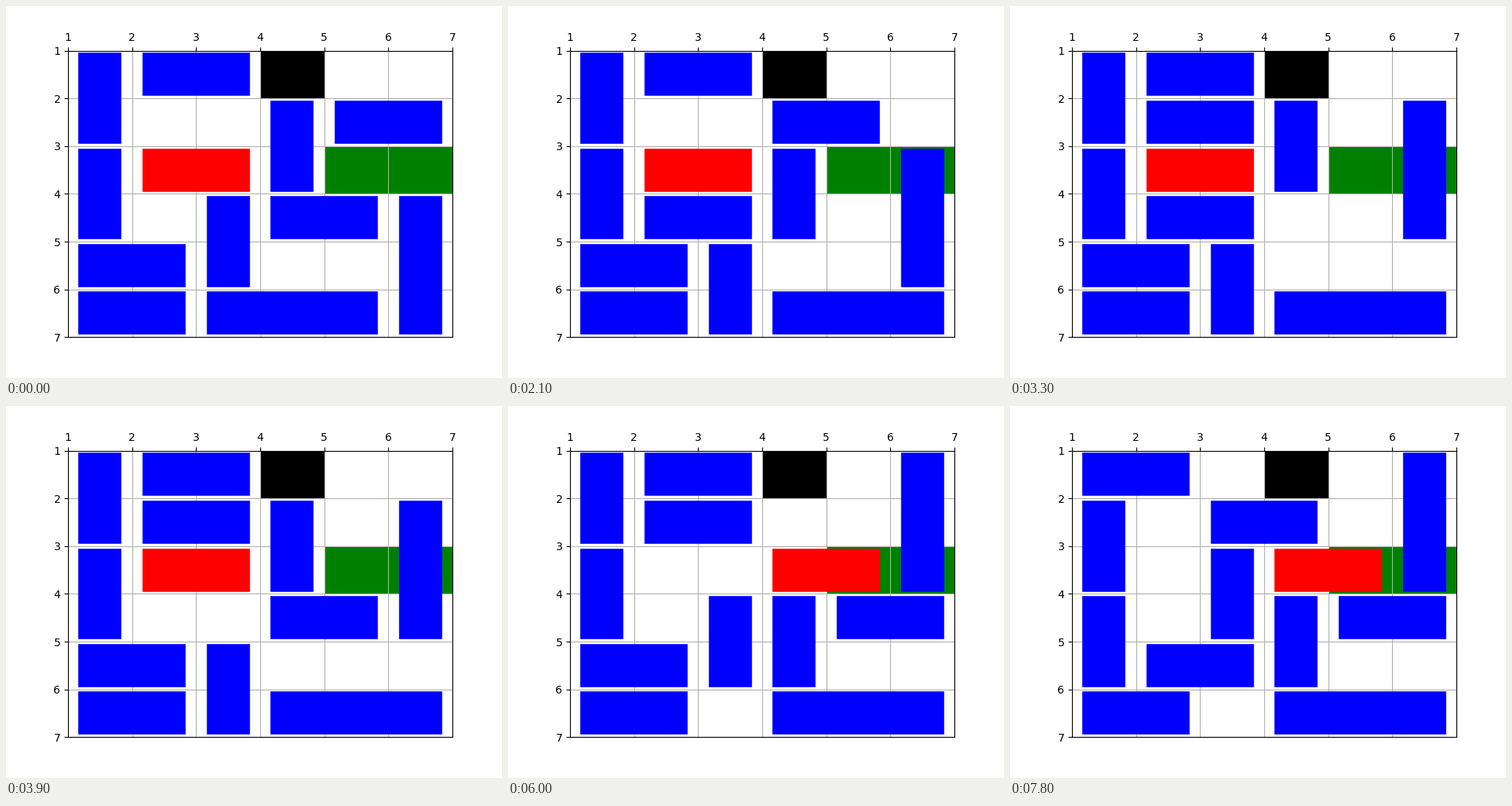
Recreate the animation shown at these times as a matplotlib script. Size 640x480 px, loop 8 s.

```python
import matplotlib.pyplot as plt
from matplotlib.animation import FuncAnimation
from matplotlib.patches import Rectangle

INTERVAL, FRAMES, MOVE_MS = 100, 80, 300

# name: (column, row, length, vertical)
CARS = {
    "A": (1, 1, 2, True), "B": (2, 1, 2, False), "C": (4, 2, 2, True),
    "D": (5, 2, 2, False), "E": (1, 3, 2, True), "R": (2, 3, 2, False),
    "F": (3, 4, 2, True), "G": (4, 4, 2, False), "H": (6, 4, 3, True),
    "I": (1, 5, 2, False), "J": (1, 6, 2, False), "K": (3, 6, 3, False),
}
# One cell per move; "+" is right or down, "-" is left or up.
MOVES = ("H- K+ F+ G- G- C+ D- H- D- D- C- G+ G+ F- H- G+ "
         "C+ C+ R+ R+ D+ F- I+ E+ A+ B-").split()

fig, ax = plt.subplots(figsize=(6.4, 4.8), dpi=100)
ax.set_xlim(1, 7)
ax.set_ylim(7, 1)
ax.set_xticks(range(1, 8))
ax.set_yticks(range(1, 8))
ax.xaxis.tick_top()
ax.grid(True)

for x, y, width, color in ((4, 1, 1, "black"), (5, 3, 2, "green")):
    ax.add_patch(Rectangle((x, y), width, 1, facecolor=color, linewidth=0))

lines = {
    name: ax.plot([], [], color="red" if name == "R" else "blue",
                  linewidth=40, solid_capstyle="projecting")[0]
    for name in CARS
}


def update(frame):
    done = MOVES[:frame * INTERVAL // MOVE_MS]
    for name, (x, y, length, vertical) in CARS.items():
        shift = done.count(name + "+") - done.count(name + "-")
        if vertical:
            y += shift
        else:
            x += shift
        reach = length - 1
        x_end, y_end = (x, y + reach) if vertical else (x + reach, y)
        lines[name].set_data([x + 0.5, x_end + 0.5], [y + 0.5, y_end + 0.5])
    return list(lines.values())


anim = FuncAnimation(fig, update, frames=FRAMES, interval=INTERVAL,
                     init_func=lambda: update(0), repeat=True, repeat_delay=0)
plt.show()
```
